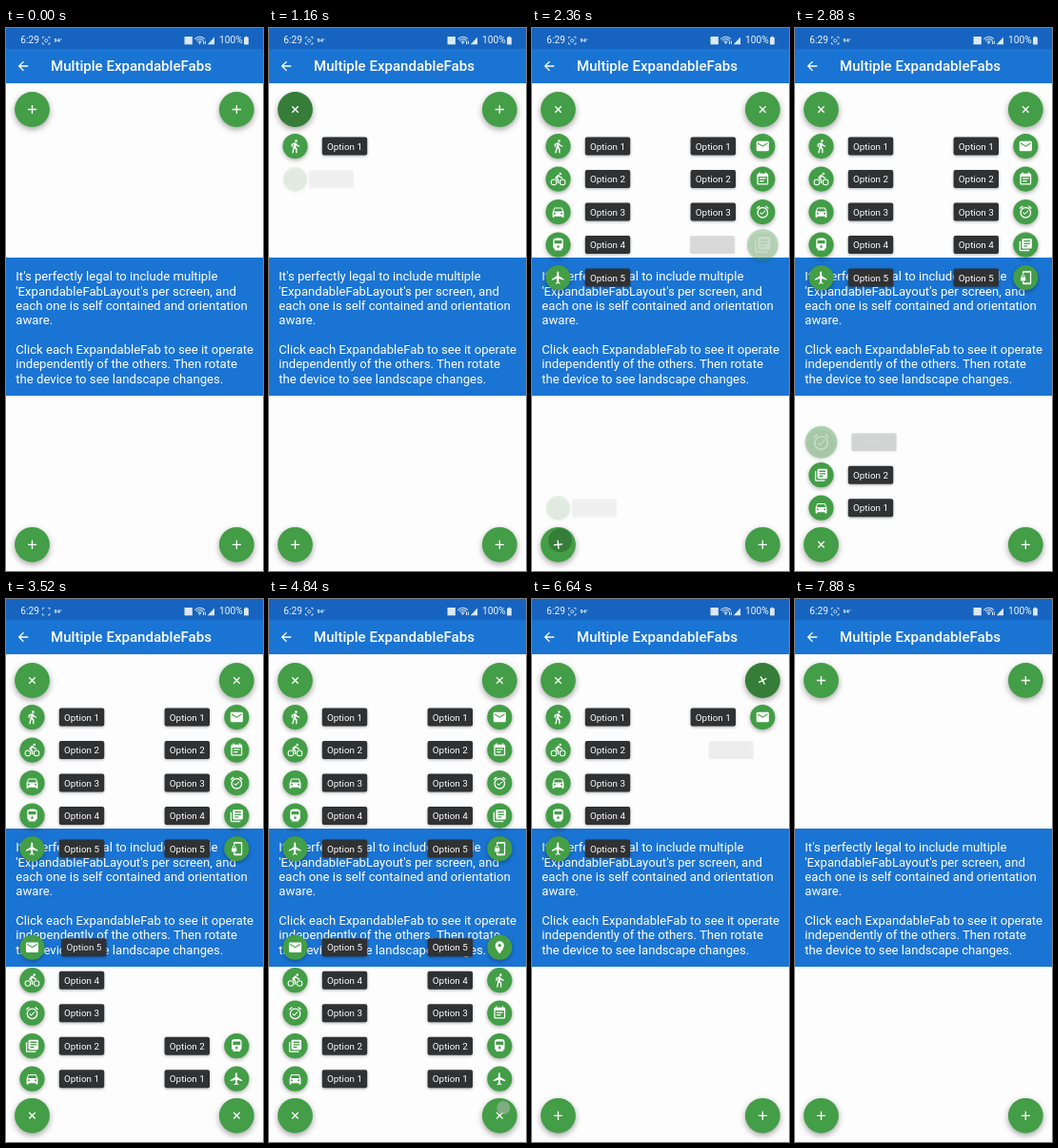
Recreate the animation shown at these times as an HTML page with a canvas. Size 270x570 px, loop 7.92 s.

```html
<!DOCTYPE html>
<html lang="en">
<head>
<meta charset="utf-8">
<title>Multiple ExpandableFabs</title>
<style>
  html, body { margin: 0; width: 100%; height: 100%; overflow: hidden; background: #fdfdfd; }
  body { position: relative; color: #fff; font-family: Roboto, "Open Sans", sans-serif; white-space: nowrap; }
  body > * { position: absolute; }
  .status { left: 0; top: 0; width: 270px; height: 22px; background: #1664bf; font-size: 10.2px; line-height: 12px; }
  .status span { position: absolute; top: 7px; opacity: .93; }
  .bar { left: 0; top: 22px; width: 270px; height: 36px; background: #1a74d3; }
  h1 { margin: 0; left: 47px; top: 30.2px; font-size: 15.05px; line-height: 20px; font-weight: 500; }
  .panel { left: 0; top: 241px; width: 270px; height: 145px; background: #1a74d3; }
  p { margin: 0; left: 10.3px; top: 253.2px; font-size: 13.13px; line-height: 15.37px; }
  canvas { left: 0; top: 0; width: 270px; height: 570px; }
</style>
</head>
<body>
<div class="status">
  <span style="left:15.3px">6:29</span>
  <span style="left:50.5px;top:6.5px;font-size:5.5px;font-weight:700">94°</span>
  <span style="left:224px">100%</span>
</div>
<div class="bar"></div>
<h1>Multiple ExpandableFabs</h1>
<div class="panel"></div>
<p>It's perfectly legal to include multiple<br>'ExpandableFabLayout's per screen, and<br>each one is self contained and orientation<br>aware.<br><br>Click each ExpandableFab to see it operate<br>independently of the others. Then rotate<br>the device to see landscape changes.</p>
<canvas id="stage"></canvas>
<script>
const LOOP = 7920;
const SLOT = 245;      // opening time of one option with its label
const POP = 150;       // opening time of one option button
const SHUT = 75;       // closing time of one option
const GREEN = '#439e47';
const UNIT = 15.76 / 24;

const canvas = document.getElementById('stage');
const ctx = canvas.getContext('2d');
const dpr = window.devicePixelRatio || 1;
canvas.width = 270 * dpr;
canvas.height = 570 * dpr;

const disc = (x, y, r) =>
  `M${x - r} ${y}a${r} ${r} 0 1 0 ${2 * r} 0a${r} ${r} 0 1 0 ${-2 * r} 0z`;
const ring = (x, y, r, w) => disc(x, y, r) + disc(x, y, r - w);

const shapes = {
  add: 'M19 13h-6v6h-2v-6H5v-2h6V5h2v6h6z',
  back: 'M20 11H7.83l5.59-5.59L12 4l-8 8 8 8 1.41-1.41L7.83 13H20z',
  walk: disc(13.5, 3.5, 2) + 'M9.8 8.9L7 23h2.1l1.8-8 2.1 2v6h2v-7.5l-2.1-2 .6-3C14.8 12 16.8 13 19 13v-2c-1.9 0-3.5-1-4.3-2.4l-1-1.6c-.4-.6-1-1-1.7-1l-.8.1L6 8.3V13h2V9.6z',
  bike: disc(15.5, 3.5, 2) + ring(5, 17, 5, 1.5) + ring(19, 17, 5, 1.5) +
    'M10.8 10.5l2.4-2.4.8.8c1.3 1.3 3 2.1 5.1 2.1V9c-1.5 0-2.7-.6-3.6-1.5l-1.9-1.9c-.9-.8-2.2-.8-3 0L7.8 8.4c-.8.8-.8 2 0 2.8L11 14v5h2v-6.2z',
  car: 'M18.9 6Q18.5 5 17.5 5h-11Q5.5 5 5.1 6L3 12v8q0 1 1 1h1q1 0 1-1v-1h12v1q0 1 1 1h1q1 0 1-1v-8zM5 11l1.5-4.5h11L19 11z' +
    disc(6.5, 14.5, 1.5) + disc(17.5, 14.5, 1.5),
  rail: 'M4 15.5C4 17.4 5.6 19 7.5 19L6 20.5v.5h12v-.5L16.5 19c1.9 0 3.5-1.6 3.5-3.5V5c0-3.5-3.6-4-8-4s-8 .5-8 4zM18 10H6V5h12z' + disc(12, 15, 2),
  plane: 'M21 16v-2l-8-5V3.5a1.5 1.5 0 0 0-3 0V9l-8 5v2l8-2.5V19l-2 1.5V22l3.5-1 3.5 1v-1.5L13 19v-5.5z',
  mail: 'M20 4H4Q2 4 2 6v12q0 2 2 2h16q2 0 2-2V6q0-2-2-2zm0 4l-8 5-8-5V6l8 5 8-5z',
  event: 'M17 10H7v2h10zM19 3h-1V1h-2v2H8V1H6v2H5Q3 3 3 5v14q0 2 2 2h14q2 0 2-2V5q0-2-2-2zm0 16H5V8h14zM14 14H7v2h7z',
  alarm: 'M22 5.7l-4.6-3.8-1.3 1.5 4.6 3.8zM7.9 3.4L6.6 1.9 2 5.7l1.3 1.5z' + ring(12, 13, 9, 2) +
    'M10.5 14.5L8.4 12.4l-1.1 1.1 3.2 3.1 6-6-1-1z',
  books: 'M4 6H2v14q0 2 2 2h14v-2H4zM20 2H8Q6 2 6 4v12q0 2 2 2h12q2 0 2-2V4q0-2-2-2zm-1 9H9V9h10zm-4 4H9v-2h6zm4-8H9V5h10z',
  lock: 'M19 1H9Q7 1 7 3v3h2V4h10v16H9v-2H7v3q0 2 2 2h10q2 0 2-2V3q0-2-2-2zM10.8 11V9.5a2.8 2.5 0 0 0-5.6 0V11Q4 11 4 12.2v3.5Q4 17 5.2 17h5.5q1.3 0 1.3-1.2v-3.5Q12 11 10.8 11zm-1.3 0h-3V9.5a1.5 1.3 0 0 1 3 0z',
  place: 'M12 2C8.1 2 5 5.1 5 9c0 5.2 7 13 7 13s7-7.8 7-13c0-3.9-3.1-7-7-7z' + disc(12, 9, 2.5)
};
const icons = {};
for (const name in shapes) icons[name] = new Path2D(shapes[name]);

const menu = (x, y, side, dir, open, close, options) => ({ x, y, side, dir, open, close, options: options.split(' ') });
const menus = [
  menu(27.5, 85.5, 1, 1, 884, 7050, 'walk bike car rail plane'),
  menu(242.3, 85.5, -1, 1, 1570, 6345, 'mail event alarm books lock'),
  menu(27.5, 542.3, 1, -1, 2329, 5640, 'car books alarm bike mail'),
  menu(242.3, 542.3, -1, -1, 3035, 4930, 'plane rail event walk place')
];

const clamp = v => Math.max(0, Math.min(1, v));
const smooth = v => v * v * (3 - 2 * v);
const ease = v => (1 - Math.cos(Math.PI * v)) / 2;
const overshoot = v => (v - 1) ** 2 * (4.5 * (v - 1) + 3.5) + 1;

function shadow(blur, dy, alpha) {
  ctx.shadowColor = `rgba(0,0,0,${alpha})`;
  ctx.shadowBlur = blur * dpr;
  ctx.shadowOffsetY = dy * dpr;
}

function circle(x, y, r, fill) {
  ctx.fillStyle = fill;
  ctx.beginPath();
  ctx.arc(x, y, r, 0, 7);
  ctx.fill();
}

function icon(name, x, y, scale = 1, angle = 0) {
  ctx.save();
  ctx.translate(x, y);
  ctx.rotate(angle);
  ctx.scale(UNIT * scale, UNIT * scale);
  ctx.translate(-12, -12);
  ctx.fillStyle = '#fff';
  ctx.fill(icons[name], 'evenodd');
  ctx.restore();
}

function button(name, x, y, scale, alpha) {
  ctx.save();
  ctx.globalAlpha = alpha;
  ctx.save();
  shadow(4, 1.6, .32);
  circle(x, y, 13.1 * scale, GREEN);
  ctx.restore();
  icon(name, x, y, scale);
  ctx.restore();
}

function label(text, cx, cy, alpha) {
  ctx.save();
  ctx.globalAlpha = alpha;
  ctx.save();
  shadow(3, 1, .3);
  ctx.fillStyle = '#303132';
  ctx.beginPath();
  ctx.roundRect(cx - 23.7, cy - 9.5, 47.4, 19, 2);
  ctx.fill();
  ctx.restore();
  ctx.fillStyle = '#fff';
  ctx.font = '9.85px Roboto, "Open Sans", sans-serif';
  ctx.textAlign = 'center';
  ctx.fillText(text, cx, cy + 3.6);
  ctx.restore();
}

function drawOption(m, i, t) {
  const age = t - m.open - i * SLOT;
  const gone = clamp((t - m.close - (4 - i) * SHUT) / SHUT);
  if (age <= 0 || gone >= 1) return;
  const pop = clamp(age / POP), slide = clamp(age / SLOT);
  const y = m.y + m.dir * (38.6 + 34.5 * i);
  button(m.options[i], m.x, y, overshoot(pop) * (1 - gone), smooth(pop) * (1 - gone));
  const reach = 52 + 45 * (overshoot(slide) - 1) - 20 * gone;
  label('Option ' + (i + 1), m.x + m.side * reach, y, smooth(slide) * (1 - gone));
}

function drawTap(m, age) {
  if (age < -110 || age > 460) return;
  ctx.save();
  ctx.beginPath();
  ctx.arc(m.x, m.y, 18.4, 0, 7);
  ctx.clip();
  ctx.globalAlpha = .21 * clamp((age + 80) / 75) * clamp((460 - age) / 130);
  const grow = ease(clamp((age + 80) / 225));
  circle(m.x + 4 * (1 - grow), m.y - 9 * (1 - grow), 6 + 13 * grow, '#000');
  ctx.restore();
}

function drawTouch(m, age) {
  if (age < -110 || age > -10) return;
  ctx.save();
  ctx.globalAlpha = .6;
  circle(m.x + 4, m.y - 8.3, 7, '#a9b5a9');
  ctx.restore();
}

function drawMain(m, t) {
  ctx.save();
  shadow(6, 2.4, .36);
  circle(m.x, m.y, 18.4, GREEN);
  ctx.restore();
  drawTap(m, t - m.open);
  drawTap(m, t - m.close);
  const turn = ease(clamp((t - m.open) / 250)) - ease(clamp((t - m.close - 225) / 300));
  icon('add', m.x, m.y, 1, -turn * Math.PI * .75);
  drawTouch(m, t - m.open);
  drawTouch(m, t - m.close);
}

function drawStatus(t) {
  ctx.save();
  ctx.strokeStyle = ctx.fillStyle = 'rgba(255,255,255,.85)';

  // eye indicator in corner brackets
  ctx.lineWidth = .8;
  ctx.setLineDash([2, 3.6, 2, 0]);
  ctx.strokeRect(38.4, 9.4, 7.6, 7.6);
  ctx.setLineDash([]);
  if (t < 3400 || t > 3650) {
    ctx.beginPath();
    ctx.arc(42.2, 13.2, 1.6, 0, 7);
    ctx.stroke();
  }

  ctx.fillRect(187.5, 9, 8.3, 8.3);

  // wireless arcs
  ctx.lineWidth = 1.1;
  for (const r of [2.5, 4.8, 7]) {
    ctx.beginPath();
    ctx.arc(203.5, 16.3, r, -Math.PI * .76, -Math.PI * .24);
    ctx.stroke();
  }
  circle(203.5, 15.8, 1, ctx.fillStyle);
  ctx.fillRect(207, 13.5, 1, 3.5);
  ctx.fillRect(208.8, 13.5, 1, 3.5);

  // signal wedge and battery
  ctx.beginPath();
  ctx.moveTo(211.7, 17.2);
  ctx.lineTo(219, 17.2);
  ctx.lineTo(219, 9.6);
  ctx.fill();
  ctx.fillRect(250, 9.8, 4.8, 7.6);
  ctx.fillRect(251.4, 8.8, 2, 1.2);
  ctx.restore();
}

function draw(t) {
  ctx.setTransform(dpr, 0, 0, dpr, 0, 0);
  ctx.clearRect(0, 0, 270, 570);
  drawStatus(t);
  icon('back', 18, 40);
  for (const m of menus) {
    for (let i = 0; i < 5; i++) drawOption(m, i, t);
    drawMain(m, t);
  }
}

const start = performance.now();
function tick() {
  draw((performance.now() - start) % LOOP);
  requestAnimationFrame(tick);
}
tick();
</script>
</body>
</html>
```
